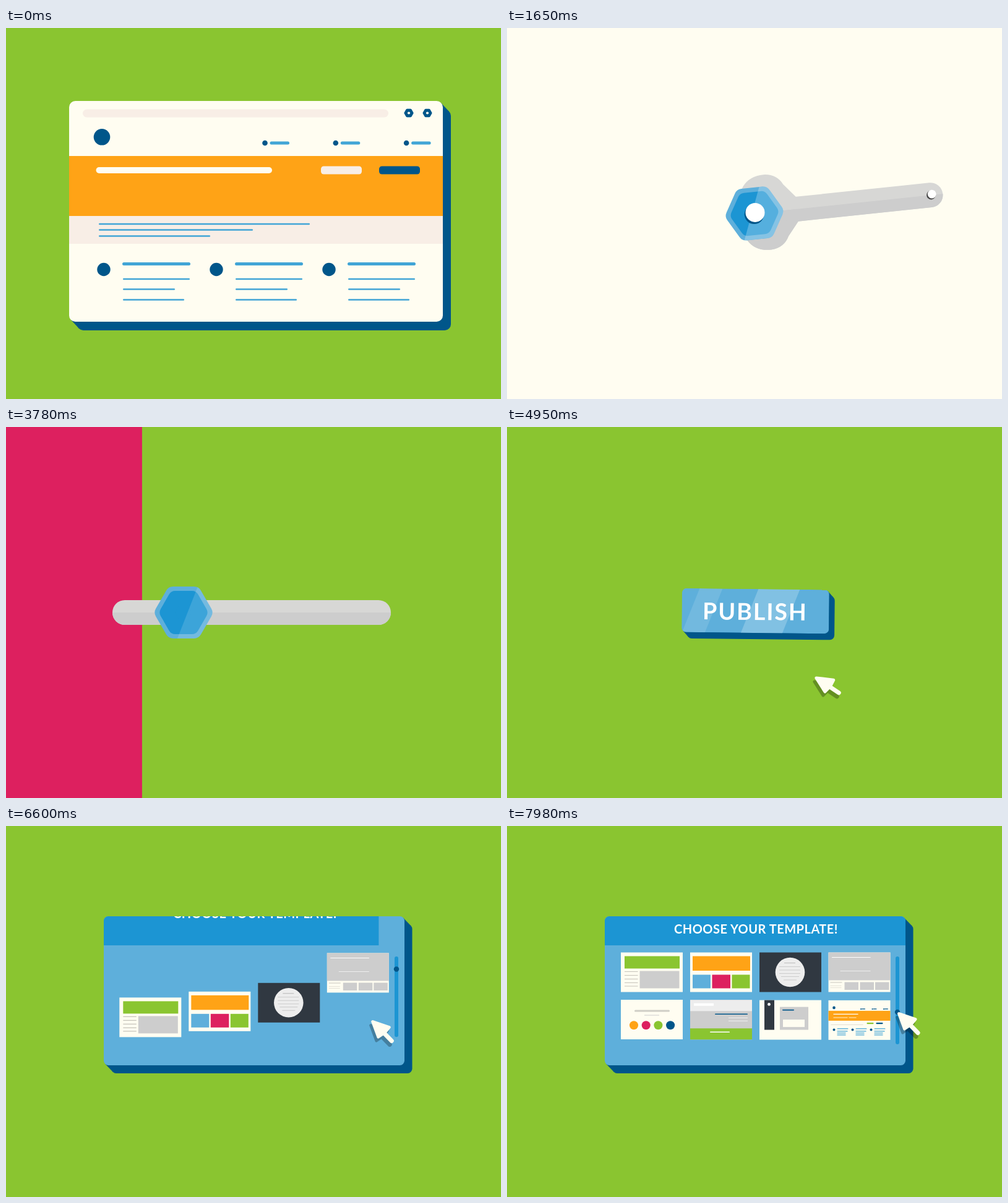
An HTML page that plays this animation: 800 by 600 pixels, repeating every 8000 ms.

```html
<!DOCTYPE html>
<html lang="en">
<head>
<meta charset="utf-8">
<title>Site builder</title>
<style>
  html, body { margin: 0; width: 100%; height: 100%; overflow: hidden; }
  svg { display: block; width: 100vw; height: 100vh; }
  text { font-family: Lato, "Open Sans", sans-serif; font-weight: 700; fill: #fff; text-anchor: middle; }
</style>
</head>
<body>
<svg id="stage" viewBox="0 0 800 600"></svg>
<script>
const LOOP = 8000;
const C = {
  green: '#8ac530', orange: '#ffa316', pink: '#dd205f', cream: '#fffdf1', beige: '#f8eee6',
  navy: '#00568a', blue: '#1c95d3', sky: '#5eafdb', line: '#41a5d6',
  gray: '#cdcdcd', light: '#d7d7d5', pale: '#ededed', dark: '#303841'
};
const stage = document.getElementById('stage');

// Timing helpers
const clamp = u => Math.max(0, Math.min(1, u));
const mix = (a, b, u) => a + (b - a) * u;
const linear = u => u;
const sine = u => .5 - .5 * Math.cos(Math.PI * u);
const out = u => 1 - (1 - u) ** 3;
const back = u => 1 + 2.9 * (u - 1) ** 3 + 1.9 * (u - 1) ** 2;
const span = (t, start, end, ease = sine) => ease(clamp((t - start) / (end - start)));
const hump = (t, start, end) => Math.sin(Math.PI * clamp((t - start) / (end - start)));
function track(t, keys, ease = sine) {
  let v = keys[0][1];
  for (let i = 1; i < keys.length; i++) {
    if (t >= keys[i - 1][0]) v = mix(keys[i - 1][1], keys[i][1], span(t, keys[i - 1][0], keys[i][0], ease));
  }
  return v;
}

// Drawing helpers
const rect = (x, y, w, h, fill, r = 0) =>
  `<rect x="${x}" y="${y}" width="${Math.max(0, w)}" height="${Math.max(0, h)}" rx="${r}" fill="${fill}"/>`;
const circle = (x, y, r, fill) => `<circle cx="${x}" cy="${y}" r="${r}" fill="${fill}"/>`;
const dash = (x1, x2, y, w, color, cap = 'round') => {
  const inset = cap === 'round' ? w / 2 : 0;
  return `<path d="M${x1 + inset},${y}H${x2 - inset}" stroke="${color}" stroke-width="${w}" stroke-linecap="${cap}"/>`;
};
const thin = (x1, x2, ys, color) => ys.map(y => dash(x1, x2, y, 1.1, color, 'butt')).join('');
const group = (transform, body, extra = '') => `<g transform="${transform}" ${extra}>${body}</g>`;
const at = (x, y, body) => group(`translate(${x},${y})`, body);
const fade = (o, body) => o > 0 ? `<g opacity="${o}">${body}</g>` : '';
const clip = (id, body) => `<clipPath id="${id}">${body}</clipPath>`;

function slab(x, y, w, h, r, dx, dy) {
  const k = r * .3;
  const pts = [[x + w - k, y + k], [x + w + dx - k, y + dy + k], [x + dx + k, y + h + dy - k], [x + k, y + h - k]];
  return `<polygon points="${pts.join(' ')}" fill="${C.navy}"/>` + rect(x + dx, y + dy, w, h, C.navy, r);
}

function hex(R, pad, fill) {
  const pts = Array.from({ length: 6 }, (_, i) => {
    const a = i * Math.PI / 3;
    return [(R * Math.cos(a)).toFixed(2), (R * Math.sin(a)).toFixed(2)];
  });
  return `<polygon points="${pts.join(' ')}" fill="${fill}" stroke="${fill}" stroke-width="${pad * 2}" stroke-linejoin="round"/>`;
}
const OUTER = [33.6, 12.9], INNER = [27, 11.5];
const darkNut = hex(...OUTER, C.navy) + circle(0, 0, 13, C.cream);

// Web page
const column = x => at(x, 0,
  circle(158, 390.5, 10.7, C.navy) + dash(188, 298, 381.5, 5, C.line) +
  dash(189, 297, 406, 2.5, C.line) + dash(189, 273, 422.5, 2.5, C.line) + dash(189, 288, 439.5, 2.5, C.line));
const page =
  slab(102, 118, 604, 357, 10, 13, 14) + rect(102, 118, 604, 357, C.cream, 10) +
  rect(124, 131.5, 494, 13, C.beige, 6.5) + circle(155, 176.3, 13.3, C.navy) +
  [0, 114.3, 228.6].map(x => circle(418.5 + x, 186, 4.3, C.navy) + dash(426.5 + x, 458 + x, 186, 5, C.line)).join('') +
  rect(102, 207, 604, 97, C.orange) + rect(145.5, 225, 284.5, 10, C.cream, 5) +
  rect(509, 223.5, 66, 13, C.beige, 4.5) + rect(603, 223.5, 66, 13, C.navy, 4.5) +
  rect(102, 304, 604, 45, C.beige) +
  dash(150, 491, 317, 2.5, C.line) + dash(150, 399, 326.5, 2.5, C.line) + dash(150, 330, 336.5, 2.5, C.line) +
  [0, 182, 364].map(column).join('');

// Template thumbnails, 100 x 64 each
const card = (body, fill = C.cream) => rect(0, 0, 100, 64, fill) + body;
const cards = [
  card(rect(6, 6, 89, 20, C.green) + thin(6, 27.5, [31, 37, 43, 49, 54.5], '#c5c3bb') + rect(30.5, 30, 64, 28, C.gray)),
  card(rect(4, 6, 93, 23.5, C.orange) + rect(4, 36, 29, 22, C.sky) + rect(35.5, 36, 29.5, 22, C.pink) + rect(67.5, 36, 29, 22, C.green)),
  card(circle(49.5, 32, 23.8, C.pale) + thin(40, 58, [17], '#bbb') + thin(32, 66, [23, 28.5, 34], '#ccc') +
    thin(35, 64, [39], '#ccc') + thin(39, 60, [44.5], '#ccc'), C.dark),
  card(rect(0, 0, 100, 45, C.gray) + thin(5.5, 68, [8], '#fff') + thin(19, 68, [30], '#eee') +
    thin(3, 22, [48.5], '#c8c6be') + thin(3, 21, [54, 57], '#e4e2d8') +
    [26, 51, 75.5].map(x => rect(x, 48, 22.5, 12.5, C.gray)).join('')),
  card(dash(22, 79, 18, 3, '#cfcec6') + thin(38, 62, [25], C.gray) +
    [C.orange, C.pink, C.green, C.navy].map((c, i) => circle(21 + 19.7 * i, 41.3, 7, c)).join('')),
  card(rect(0, 0, 100, 18, C.pale) + rect(6, 5.5, 32, 4, '#fff') + rect(0, 46, 100, 18, C.green) +
    dash(40, 93, 23, 1.6, C.navy) + thin(62, 93, [29, 34], '#eee') + dash(32, 64, 52, 1.6, '#fff'), C.gray),
  card(rect(8, 0, 16, 48, C.dark) + circle(15.5, 6.8, 2.4, '#fff') + rect(33, 11, 46, 37, C.gray) +
    dash(37, 56, 16, 1.6, C.navy) + rect(38, 31.5, 35, 12, C.cream)),
  card(circle(9, 12, 2.3, C.navy) + rect(0, 17, 100, 16, C.orange) + thin(8, 48, [22.5], '#fff') +
    thin(8, 31, [28], '#ffe0a8') + thin(33, 45, [28], '#ffe0a8') +
    [52.5, 71, 89.5].map(x => circle(x, 14, 1, C.navy) + dash(x + 1, x + 7, 14, 1.4, C.navy)).join('') +
    thin(4, 56, [39.5], '#e8e2d8') + rect(62, 36, 11, 2.4, C.green, 1) + rect(77, 36, 11, 2.4, C.navy, 1) +
    [9, 39, 69].map(x => circle(x, 47.5, 2, C.navy) + dash(x + 5, x + 23, 46, 1.4, C.line) +
      thin(x + 5, x + 22, [50], C.line) + thin(x + 5, x + 19, [53, 56], C.line)).join(''))
];
const cardX = [184, 296, 408, 519.5];
const riseAt = [6478, 6463, 6438, 6228];

const pointer = fill =>
  `<g fill="${fill}" stroke="${fill}" stroke-linejoin="round" stroke-linecap="round">
  <path d="M2.5,2.5L29,11.5L22,20L11.5,27Z" stroke-width="5"/><path d="M17,17L33,33.5" stroke-width="7"/></g>`;

const HEAD = 'M-16,-42Q-5,-61 21,-61Q42,-60 51,-42L70,-19V19L51,42Q42,60 21,61Q-5,61 -16,42Z';

// Nut at 0,0 with its glossy half
function nut(t, angle) {
  const shift = mix(-11, 0, span(t, 1800, 2400));
  const shine = track(t, [[3090, .25], [3780, .14]], linear);
  const hole = 1 - span(t, 1800, 2200);
  return clip('nutClip', hex(...OUTER, '#fff').replace(/<polygon/, '<polygon') +
      `<rect x="-40" y="-42" width="80" height="84"/>`) +
    group(`rotate(${angle})`,
      hex(...OUTER, C.sky) + hex(...INNER, C.blue) +
      clip('glossClip', `<polygon points="${23 + shift},-42 60,-42 60,42 ${-10 + shift},42"/>`) +
      `<g clip-path="url(#glossClip)" opacity="${shine}">${hex(...OUTER, '#fff')}</g>` +
      fade(hole, group(`rotate(${-angle})`, circle(-.5, 1.3, 15.8, C.navy) + circle(1, -1.6, 15.5, '#fff'))));
}

// Wrench that turns into the slider bar
function tool(t, angle) {
  const slide = 480 * (1 - span(t, 960, 1290, out));
  const head = 1 - span(t, 1900, 2250);
  const right = track(t, [[1740, 306], [1840, 266], [2100, 266], [2250, 306], [2500, 306], [3000, 207.5], [3780, 222], [4170, 226], [4400, 20]]);
  const left = track(t, [[1740, -40], [2150, -10], [2400, 400], [2600, 318], [3000, 209], [3780, 228], [4200, 250], [4400, 20]]);
  const shape = fill => (head > 0 ? `<path d="${HEAD}" transform="scale(${head})" fill="${fill}"/>` : '') +
    rect(-left, -20, left + right, 40, fill, Math.min(20, (left + right) / 2));
  return group(`translate(${400 + slide},300) rotate(${angle})`,
    clip('lower', '<rect x="-500" y="0" width="1000" height="100"/>') +
    shape(C.light) + `<g clip-path="url(#lower)">${shape(C.gray)}</g>` +
    fade(1 - span(t, 1800, 2100), at(right - 18, -1, circle(-1, 1, 7.3, '#444') + circle(.4, -.4, 6.9, '#fff'))));
}

function intro(t) {
  const k = span(t, 150, 945);
  const x = mix(651, 400, k), y = mix(137.5, 300, k);
  const size = .161 * (1 / .161) ** k;
  const second = group(`translate(681,137.5) scale(${.161 * (1 - span(t, 300, 750))})`, darkNut);
  return rect(0, 0, 800, 600, C.green) +
    group(`translate(${x},${y}) scale(${17 ** k}) translate(-651,-137.5)`, page + second) +
    group(`translate(${x},${y}) scale(${size})`, nut(t, 0) + fade(1 - span(t, 420, 860), darkNut));
}

function wrenchAndSlider(t) {
  const angle = track(t, [[1260, 0], [1470, 28], [1740, -17], [2250, -360]]);
  const wipe = (start, color) => {
    const x = 800 * (1 - span(t, start, start + 592));
    return x < 800 ? rect(x, 0, 800 - x, 600, color) : '';
  };
  const nutX = track(t, [[2797, 400], [4084, 270], [4200, 270], [4440, 400]]);
  const nutY = 300 - 110 * hump(t, 4280, 4640);
  const pop = 1 - span(t, 4560, 4660);
  return rect(0, 0, 800, 600, C.cream) + wipe(2886, C.orange) + wipe(3141, C.pink) + wipe(3397, C.green) +
    (t >= 960 && t < 4400 ? tool(t, angle) : '') +
    (pop > 0 ? group(`translate(${nutX},${nutY}) scale(${pop})`, nut(t, angle)) : '');
}

function panel(t) {
  const grow = span(t, 5805, 6200, back);
  const press = 6 * hump(t, 5380, 5620);
  const [x, y, w, h] = [[282.5, 158], [262, 146], [238, 486], [71, 241]].map(([a, b]) => mix(a, b, grow));
  const dx = mix(9, 12.5, grow), dy = mix(10, 13, grow);
  const size = span(t, 4560, 4800, back);
  const label = 1 - span(t, 5810, 5930);
  const stripe = (a, b, o) =>
    `<polygon points="${a},262 ${b},262 ${b - 32},344 ${a - 32},344" fill="#fff" opacity="${o}"/>`;
  let face = rect(x, y, w, h, C.sky);
  if (label > 0) {
    face += fade(label, stripe(311, 348, .12) + stripe(406, 473, .22) +
      `<text x="401" y="312" font-size="37.5" letter-spacing="2">PUBLISH</text>`);
  }
  if (t > 6200) {
    const bar = track(t, [[6300, 0], [6600, 130], [6720, 142]], out);
    const knob = mix(231.5, 301, span(t, 7380, 7800));
    if (bar > 0) face += rect(628, 211, 6, bar, C.blue, 3);
    if (bar > 15) face += circle(631, knob, 4.2, C.navy);
    cards.forEach((c, i) => {
      const col = i % 4, first = i < 4;
      const start = first ? riseAt[col] : 7390 + 30 * col;
      const lift = first ? 11 * hump(t, 7440 + 40 * col, 7760 + 40 * col) : 0;
      const drop = (first ? 190 : 110) * (1 - span(t, start, start + 450, out));
      const top = first ? 204.5 : 281 + .3 * col;
      if (t > start) face += at(cardX[col] - (1 - span(t, 6600, 6900)) * .7, top + drop - lift, c);
    });
    const title = mix(-28, 0, span(t, 6590, 6900, out));
    face += rect(158, 146, 486 * span(t, 6450, 6720, out), 47, C.blue);
    if (t > 6590) face += `<text x="402.5" y="${174.3 + title}" font-size="20" letter-spacing=".5">CHOOSE YOUR TEMPLATE!</text>`;
  }
  const turn = .6 * (1 - span(t, 5810, 6100));
  return group(`translate(400,298) scale(${size}) rotate(${turn}) translate(-400,-298)`,
    slab(x, y, w, h, 7.5, dx, dy) + clip('face', rect(x, y, w, h, '#fff', 7.5)) +
    group(`translate(${press},${press})`, `<g clip-path="url(#face)">${face}</g>`));
}

function cursor(t) {
  const x = track(t, [[4540, 815], [4950, 497], [5280, 455], [6100, 455], [6660, 594], [7080, 631]]);
  const y = track(t, [[4540, 490], [4950, 404], [5280, 322], [6100, 322], [6600, 314], [7080, 231.5], [7380, 231.5], [7800, 301]]);
  const turn = track(t, [[5900, -12], [6400, 0]]);
  const size = 1 - .12 * hump(t, 5380, 5620);
  const shape = fill => group(`rotate(${turn}) scale(${size})`, pointer(fill));
  return at(x - 3, y + 6, fade(.27, shape('#000'))) + at(x, y, shape(C.cream));
}

function render(t) {
  let body;
  if (t < 945) body = intro(t);
  else if (t < 4680) body = wrenchAndSlider(t);
  else body = rect(0, 0, 800, 600, C.green);
  if (t > 4560) body += panel(t) + cursor(t);
  stage.innerHTML = body;
}

const began = performance.now();
function tick() {
  render((performance.now() - began) % LOOP);
  requestAnimationFrame(tick);
}
tick();
</script>
</body>
</html>
```
